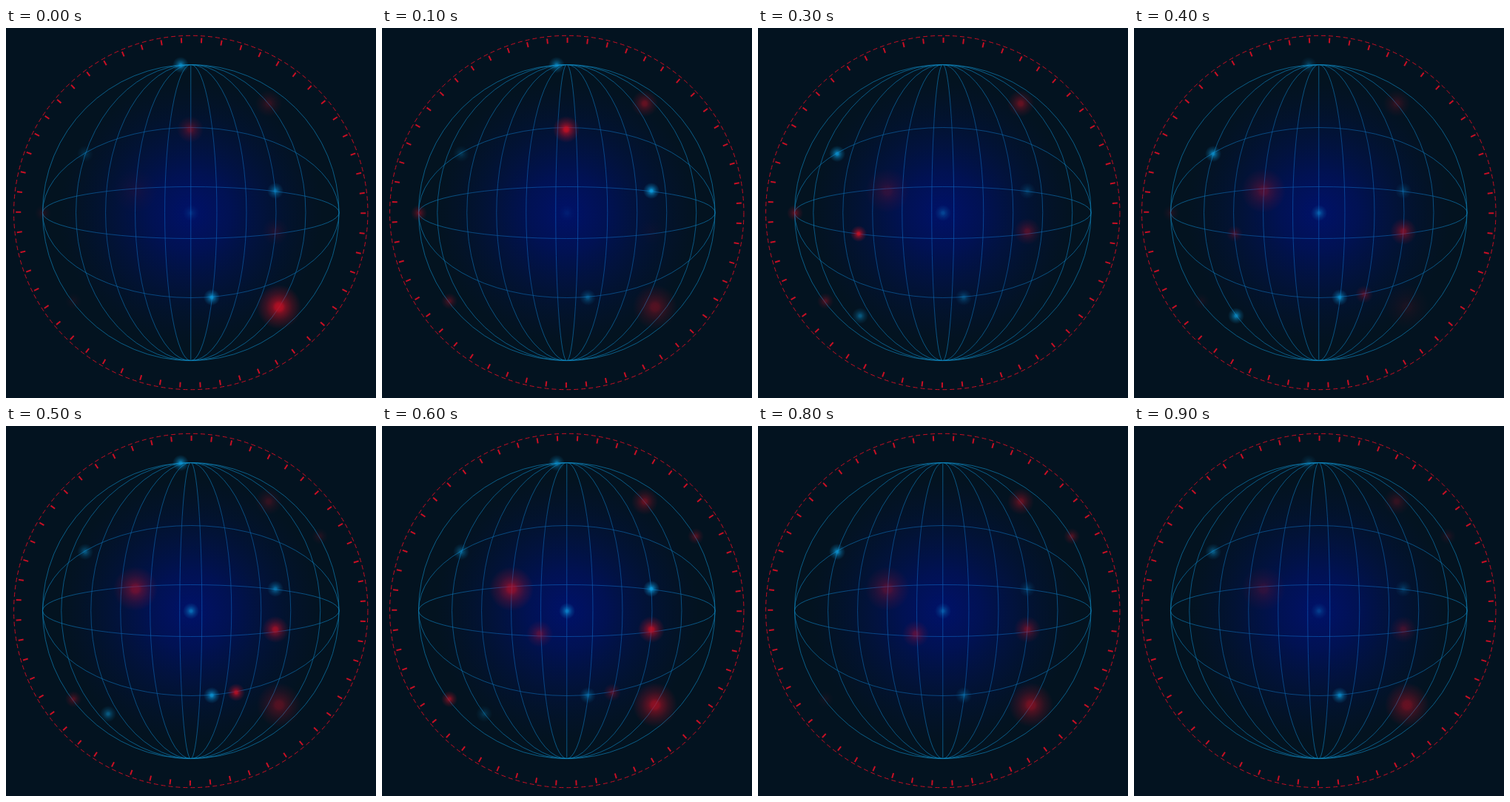
Recreate the animation shown at these times as an HTML page with a canvas. Size 500 by 500 pixels, loop 1 s.

```html
<!DOCTYPE html>
<html lang="en">
<head>
<meta charset="utf-8">
<title>Globe radar</title>
<style>
html, body { margin: 0; width: 100%; height: 100%; overflow: hidden; background: #031320; }
canvas { display: block; width: 500px; height: 500px; }
</style>
</head>
<body>
<canvas id="stage" width="500" height="500"></canvas>
<script>
const ctx = document.getElementById('stage').getContext('2d');
const TAU = Math.PI * 2;
const CX = 249.75, CY = 249.5, R = 200.3;
const STEP = 100, STEPS = 10;
const RED = '200,15,36', BLUE = '12,160,226';

// A light swells to its gain at each peak and fades in a straight line over span steps.
const lights = [];
const light = rgb => (x, y, r, gain, span, ...peaks) =>
  lights.push({ rgb, x, y, r, gain, span, peaks });
const red = light(RED), blue = light(BLUE);

red(249, 137, 18, .95, 1.8, 1);
red(355, 102, 18, .75, 3, 2, 7);
red(369, 377, 30, .95, 3.2, 6.8);
red(369, 377, 30, .95, 1.6, .1);
red(50, 250, 11, .8, 2.5, 2);
red(91, 369, 11, .7, 2.3, 2, 6);
red(364, 275, 18, .9, 5, 5.8);
red(175, 220, 30, .7, 4.5, 6);
red(136, 278, 11, .95, 1.5, 3);
red(311, 360, 12, .88, 1.8, 5);
red(424, 149, 11, .65, 2.7, 7);
red(213, 281, 18, .92, 1.9, 7);
blue(236, 50, 11, .95, 2, .4, 5.3);
blue(107, 170, 11, .95, 3.2, 3.4, 7.5);
blue(364, 220, 11, .95, 2.8, 1, 6);
blue(278, 364, 11, 1, 2.6, 4.6, 9.6);
blue(250, 250, 11, .75, 5.4, 5.8);
blue(138, 389, 11, .75, 3, 4);

function level({ gain, span, peaks }, step) {
  const gaps = peaks.map(p => {
    const d = Math.abs(step - p);
    return Math.min(d, STEPS - d);
  });
  return gain * Math.max(0, 1 - Math.min(...gaps) / span);
}

function radial(x, y, r, stops) {
  const g = ctx.createRadialGradient(x, y, 0, x, y, r);
  stops.forEach(([pos, colour]) => g.addColorStop(pos, colour));
  return g;
}

const core = radial(CX, CY, 178, [
  [0, 'rgba(0,17,110,.93)'], [.3, 'rgba(0,17,104,.71)'],
  [.65, 'rgba(0,18,92,.33)'], [1, 'rgba(0,18,70,0)']
]);
const wire = radial(CX, CY, R, [
  [0, 'rgba(10,84,184,.78)'], [.6, 'rgba(10,96,168,.72)'], [1, 'rgba(12,125,178,.78)']
]);

function oval(rx, ry) {
  ctx.beginPath();
  ctx.ellipse(CX, CY, rx, ry, 0, 0, TAU);
  ctx.stroke();
}

function drawGlobe(odd) {
  ctx.fillStyle = core;
  ctx.fillRect(CX - R, CY - R, 2 * R, 2 * R);
  ctx.strokeStyle = wire;
  ctx.lineWidth = .9;
  oval(R, 200);
  oval(R, 115);
  oval(R, 35);
  for (let rx = odd ? 15 : 35.2; rx < 180; rx += 40) oval(rx, 200);
  if (!odd) {
    ctx.beginPath();
    ctx.moveTo(CX, CY - 200);
    ctx.lineTo(CX, CY + 200);
    ctx.stroke();
  }
}

function drawRing(odd) {
  ctx.strokeStyle = `rgb(${RED})`;
  ctx.lineWidth = 1;
  ctx.setLineDash([6, 4]);
  ctx.beginPath();
  ctx.arc(CX, CY, 239.2, 0, TAU);
  ctx.stroke();
  ctx.setLineDash([]);

  const count = 54;
  const turn = .0035 - Math.PI / 2 + (odd ? 0 : Math.PI / count);
  ctx.lineWidth = 2;
  ctx.beginPath();
  for (let i = 0; i < count; i++) {
    const a = turn + i * TAU / count;
    const c = Math.cos(a), s = Math.sin(a);
    ctx.moveTo(CX + 229.5 * c, CY + 229.5 * s);
    ctx.lineTo(CX + 236.5 * c, CY + 236.5 * s);
  }
  ctx.stroke();
}

function drawLight(spot, step) {
  const a = level(spot, step);
  if (!a) return;
  const { rgb, x, y, r } = spot;
  const tone = k => `rgba(${rgb},${a * k})`;
  ctx.fillStyle = radial(x, y, r, [
    [0, tone(1)], [.17, tone(.92)], [.3, tone(.64)], [.6, tone(.3)], [1, tone(0)]
  ]);
  ctx.fillRect(x - r, y - r, 2 * r, 2 * r);
}

function draw(step) {
  const odd = step % 2 === 1;
  ctx.fillStyle = '#031320';
  ctx.fillRect(0, 0, 500, 500);
  drawGlobe(odd);
  drawRing(odd);
  lights.forEach(spot => drawLight(spot, step));
}

const start = performance.now();
function tick() {
  const t = Math.max(0, performance.now() - start);
  draw(Math.floor(t / STEP) % STEPS);
  requestAnimationFrame(tick);
}
tick();
</script>
</body>
</html>
```
